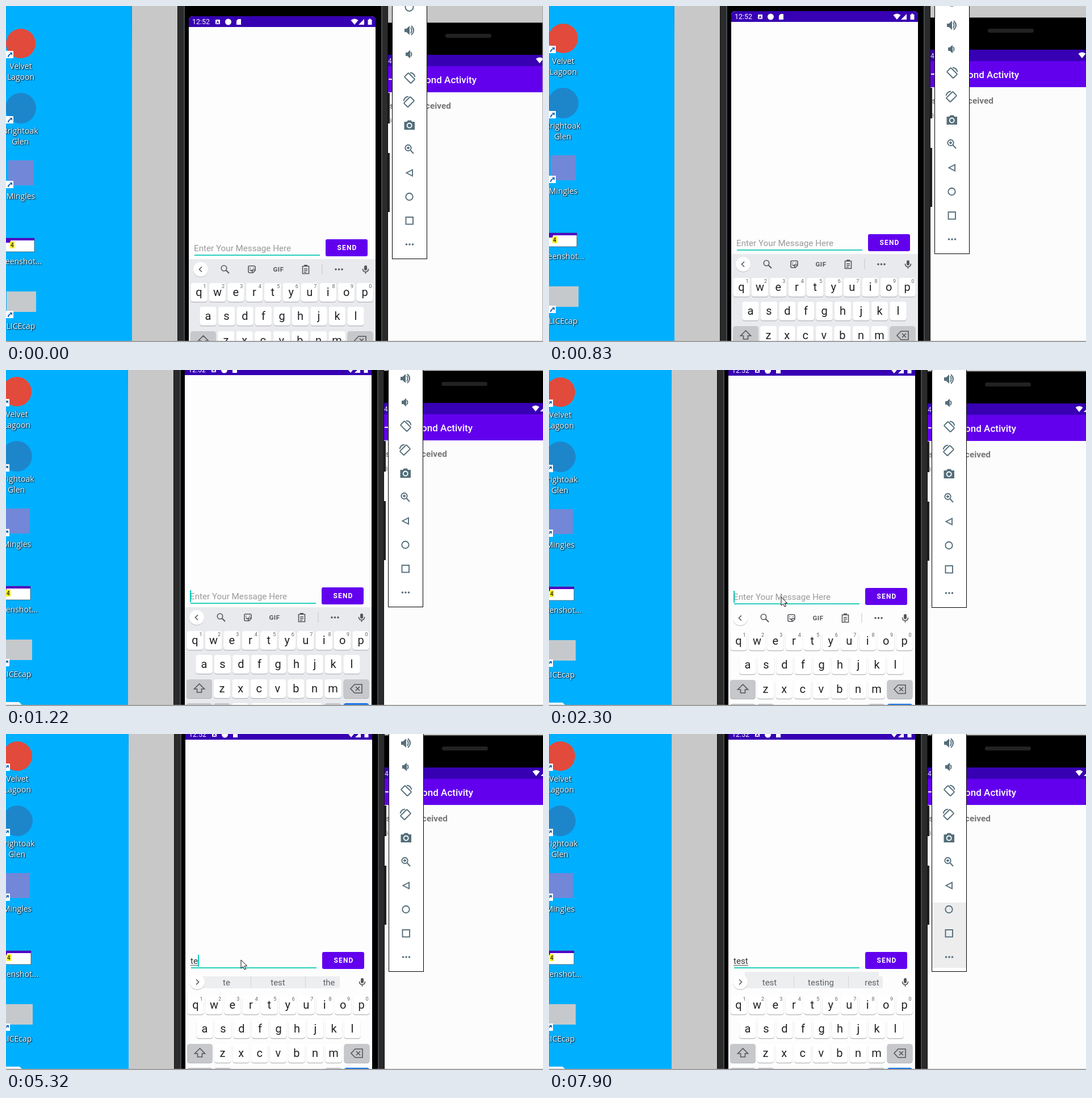
Write an HTML page that moves like this. It is 946 px wide and 592 px high and loops after 8000 ms.

```html
<!DOCTYPE html>
<html lang="en">
<head>
<meta charset="utf-8">
<title>Typing a message</title>
<style>
  html, body { margin: 0; width: 100%; height: 100%; overflow: hidden; background: #c8c8c8; }
  svg { display: block; width: 946px; height: 592px; font-family: Roboto, sans-serif; }
  .mid, .desk { text-anchor: middle; }
  .desk { font: 14px "Open Sans", sans-serif; fill: #fff; text-shadow: 1px 1px 2px #000, 0 0 2px #0008; }
  .line { fill: none; stroke: #546e7a; stroke-width: 1.9; }
  .solid { fill: #546e7a; }
  .dark { fill: none; stroke: #54575b; stroke-width: 1.6; }
</style>
</head>
<body>
<svg viewBox="0 0 946 592">
  <defs>
    <path id="wifi" d="M-6.5-3Q0-8 6.5-3L0 5z" fill="#fff"/>
    <path id="signal" d="M5-5V5H-5z" fill="#fff"/>
    <g id="shortcut">
      <rect width="13" height="13" fill="#fff"/>
      <path d="M3 11Q3 6 8 5L6 3H11V8L9 6Q5 8 5 11z" fill="#1668b5"/>
    </g>
    <g id="rotate" class="line">
      <rect x="-8" y="-5" width="16" height="10" rx="1" transform="rotate(45)"/>
      <path d="M1-9.500Q8-9 9.500-2"/>
    </g>
  </defs>
  <g id="world">
    <!-- desktop -->
    <rect x="-10" y="-10" width="980" height="680" fill="#c8c8c8"/>
    <rect x="-10" y="-10" width="232" height="680" fill="#00b0ff"/>
    <path d="M218-10L222 75V-10z" fill="#0aa4ec"/>
    <circle cx="26" cy="66" r="26" fill="#e24a3b"/>
    <circle cx="26" cy="180" r="27" fill="#1d86cb"/>
    <rect x="4" y="272" width="44" height="44" fill="#7387d8"/>
    <path d="M-10 409H50V433H-10z" fill="#fff" stroke="#333" stroke-width=".6"/>
    <path d="M-10 409H50V413H8V417H-10z" fill="#5300c4"/>
    <rect x="7" y="415" width="8" height="12" fill="#f5ee25"/>
    <text x="8" y="425" font-size="10">4</text>
    <path d="M-4 415V433" stroke="#111" stroke-width="8"/>
    <rect x="1" y="503" width="52" height="36" fill="#c6c9cc"/>
    <path d="M0 613H30L39 622V650H0z" fill="#f6f6f6"/>
    <use href="#shortcut" y="79"/><use href="#shortcut" y="194"/>
    <use href="#shortcut" y="308"/><use href="#shortcut" y="537"/>
    <g class="desk">
      <text x="26" y="111">Velvet</text><text x="26" y="130">Lagoon</text>
      <text x="25" y="225">Brightoak</text><text x="25" y="244">Glen</text>
      <text x="26" y="340">Mingles</text>
      <text x="63" y="455" text-anchor="end">Screenshot...</text>
      <text x="26" y="569">LICEcap</text>
    </g>

    <!-- phone behind -->
    <rect x="660" y="29" width="300" height="60" fill="#000"/>
    <path d="M660 29.500H960" stroke="#4a4a4a"/>
    <rect x="774" y="49" width="81" height="7" rx="3.500" fill="#222"/>
    <rect x="660" y="86" width="300" height="20" fill="#3700b3"/>
    <rect x="660" y="106" width="300" height="46" fill="#6200ee"/>
    <rect x="660" y="152" width="300" height="500" fill="#fcfcfc"/>
    <use href="#wifi" x="940" y="96"/><use href="#signal" x="953" y="96"/>
    <text x="673" y="101" font-size="12" fill="#ddd">4</text>
    <path d="M674 129H680" stroke="#fff" stroke-width="2"/>
    <g text-anchor="end" font-weight="500">
      <text x="829" y="136" font-size="17" fill="#fff">Second Activity</text>
      <text x="784" y="181" font-size="15.400" font-weight="700" fill="#777">Message Received</text>
    </g>
    <text x="673" y="205" font-size="12" fill="#888">a</text>

    <!-- phone in front -->
    <rect x="302" y="-10" width="371" height="680" fill="#111"/>
    <rect x="303" y="-10" width="369" height="680" fill="#2b2b2b"/>
    <rect x="313" y="-10" width="350" height="680" fill="#444a50"/>
    <rect x="315" y="-10" width="346" height="680" fill="#000"/>
    <path d="M674.500 153V207M674.500 259V363" stroke="#222" stroke-width="3"/>
    <path d="M322 660V26Q322 18 330 18H643Q651 18 651 26V660z" fill="#fdfdfd"/>
    <path d="M322 37V26Q322 18 330 18H643Q651 18 651 26V37z" fill="#3700b3"/>
    <text x="328" y="32" font-size="12.500" fill="#fff">12:52</text>
    <g fill="#fff">
      <rect x="369" y="24" width="8" height="8" rx="1"/>
      <circle cx="391.500" cy="28" r="5.500"/>
      <path d="M409 23H414V33H406V26z"/>
      <path d="M637.500 24H639.500V22.500H642.500V24H644.500V33H637.500z"/>
    </g>
    <text class="mid" x="373" y="31" font-size="7.500" font-weight="700" fill="#3700b3">A</text>
    <use href="#wifi" x="614" y="28"/><use href="#signal" x="626" y="28"/>

    <!-- message field -->
    <text id="message" x="331" y="432" font-size="15.200"></text>
    <path id="underline" stroke="#555"/>
    <rect id="caret" y="416" width="2" height="21" fill="#03cdb9"/>
    <path d="M332 439H553" stroke="#2ad0bd" stroke-width="2"/>
    <rect x="563" y="411" width="74" height="30" rx="3" fill="#6200ee"/>
    <text class="mid" x="601" y="430" font-size="12" font-weight="700" letter-spacing="1.100" fill="#fff">SEND</text>

    <!-- keyboard -->
    <rect id="board" x="322" y="446" width="329" height="210"/>
    <path id="strip" fill="#eceef0"/>
    <circle cx="343" cy="465" r="13" fill="#b9bbbe"/>
    <circle cx="343" cy="464" r="13" fill="#fff"/>
    <path id="chevron" class="dark" d="M2-4.500L-2.500 0L2 4.500"/>
    <g id="tools" class="dark">
      <circle cx="384" cy="462" r="4.700"/><path d="M387.500 465.500L393 471" stroke-width="2"/>
      <path d="M429 458H437Q439 458 439 460V466L435 470H429Q427 470 427 468V460Q427 458 429 458zM439 465H434V470M429.500 464.500Q432 468 434 465M430 461V462.500M436 461V462.500"/>
      <path d="M522.500 458.500H533.500V471.500H522.500zM525 463H531M525 466H531M525 469H529"/>
      <path d="M525 457.500H531" stroke-width="3"/>
      <path d="M557 455V473" stroke="#c3c6c9" stroke-width="1"/>
      <path d="M581 464H595" stroke-width="3.600" stroke-linecap="round" stroke-dasharray="0 5.500"/>
      <text class="mid" x="480" y="468" font-size="11.500" font-weight="700" letter-spacing=".5" fill="#54575b" stroke="none">GIF</text>
    </g>
    <g id="words" class="mid" font-size="15" fill="#606366">
      <path d="M437.500 454V474M533.500 454V474" stroke="#d2d4d6"/>
      <text x="394.500" y="470"></text><text x="485" y="470"></text><text x="575" y="470"></text>
    </g>
    <rect x="631" y="457" width="5" height="9" rx="2.500" fill="#54575b"/>
    <path class="dark" d="M628.500 463Q628.500 468.500 633.500 468.500T638.500 463M633.500 468V472"/>
    <g id="keys"></g>
    <path d="M347.500 581L338.500 590H343.500V596H351.500V590H356.500z" class="dark"/>
    <path d="M621 582H634V597H621L614 589.500zM623 586L630 593M630 586L623 593" class="dark"/>

    <!-- emulator controls -->
    <rect x="680.500" y="-10" width="61" height="455.500" fill="#fff" stroke="#000"/>
    <rect id="hover" x="681" y="324" width="60" height="115" fill="#ededee"/>
    <g class="line">
      <circle cx="710.500" cy="2" r="7"/>
      <path d="M713 38Q716 43 713 48M714 35Q722 43 714 51M713 81Q716 85 713 89"/>
      <circle cx="708.500" cy="250" r="5.200"/><path d="M712.500 254L718 260M706 250H711M708.500 247.500V252.500"/>
      <path d="M716 288.500V299.500L705.500 294z"/>
      <circle cx="710.500" cy="336" r="6.200"/>
      <rect x="704.500" y="372" width="12.500" height="12.500"/>
      <path d="M705.500 420H718" stroke-width="3.600" stroke-linecap="round" stroke-dasharray="0 5.500"/>
    </g>
    <path class="solid" d="M702 40H705.500L711 35V51L705.500 46H702zM704 82H707L712 77.500V92.500L707 88H704zM701.500 204H706L708 201.500H713.500L715.500 204H720V218H701.500z"/>
    <circle cx="710.700" cy="210.500" r="4" fill="#546e7a" stroke="#fff" stroke-width="1.800"/>
    <use href="#rotate" x="711" y="127"/>
    <use href="#rotate" transform="translate(710 169) scale(-1 1)"/>
  </g>
  <path id="cursor" d="M0 0V15L3.500 11.700L6 17L8.500 16L6 10.800H10.700z" fill="#fff" stroke="#111"/>
  <path d="M0 591H946" stroke="#a0a0a0" stroke-width="2"/>
  <path id="edge" d="M945.500 0V592" stroke="#a4a4a4"/>
</svg>
<script>
const LOOP = 8000;
const $ = id => document.getElementById(id);

// Keyboard
const GRAY = '#c6c8cb';
function key(x, y, w, fill = '#fff', label = '', hint = '') {
  const box = (dy, color) =>
    `<rect x="${x - w / 2}" y="${y + dy}" width="${w}" height="33" rx="4.500" fill="${color}"/>`;
  return box(1.2, '#b3b5b8') + box(0, fill) +
    `<text class="mid" x="${x}" y="${y + 23}" font-size="20" fill="#202124">${label}</text>` +
    `<text class="mid" x="${x + 10}" y="${y + 9}" font-size="9" fill="#606366">${hint}</text>`;
}
const row = (letters, x, y, step, hints = '') =>
  [...letters].map((c, i) => key(x + i * step, y, 29.5, '#fff', c, hints[i])).join('');
$('keys').innerHTML =
  row('qwertyuiop', 340, 488, 32.45, '1234567890') +
  row('asdfghjkl', 356, 530, 32.5) +
  row('zxcvbnm', 387.5, 573, 32.6) +
  key(347.5, 573, 45, GRAY) + key(624, 573, 45, GRAY) +
  key(347.5, 615, 45, GRAY) + key(387.5, 615, 29.5, GRAY) +
  key(420, 615, 29.5) + key(501, 615, 126) +
  key(583, 615, 29.5, GRAY) + key(624, 615, 45, '#1a73e8');

// Timelines: [start, ...values], each held until the next entry
const view = [[0, 0, 0], [270, 0, -1], [455, 0, -3], [640, -1, -6], [830, -1, -9],
  [950, -3, -16], [1085, -5, -23], [1220, -7, -28], [1500, -6, -27]];
const pointer = [[0, -50, -50], [1900, 470, 120], [2040, 440, 280], [2170, 412, 392],
  [2300, 409, 400], [3100, 412, 399], [3250, 414, 398], [6950, 450, 392], [7090, 520, 360],
  [7230, 600, 315], [7360, 650, 302], [7500, 690, 330], [7640, -50, -50]];
const typed = [[0, '', 331], [3920, 't', 337], [4050, 'te', 344],
  [5720, 'tes', 352], [6130, 'test', 357]];
const suggestions = [[0], [4190, 'te', 'test', 'the'], [5850, 'tes', 'test', 'testing'],
  [6400, 'test', 'testing', 'rest']];
const caretOn = [[0, false], [1220, true], [1750, false], [2240, true], [2680, false],
  [3100, true], [3650, false], [3920, true], [4730, false], [5320, true],
  [6820, false], [7360, true], [7900, false]];

const at = (track, t) => track.findLast(entry => entry[0] <= t).slice(1);
const show = (id, on) => $(id).setAttribute('visibility', on ? 'visible' : 'hidden');
const set = (id, name, value) => $(id).setAttribute(name, value);
const move = (id, [x, y]) => set(id, 'transform', `translate(${x} ${y})`);

function draw(now) {
  const t = now % LOOP;
  move('world', at(view, t));
  move('cursor', at(pointer, t));

  const [text, end] = at(typed, t);
  $('message').textContent = text || 'Enter Your Message Here';
  set('message', 'fill', text ? '#333' : '#9a9a9a');
  set('underline', 'd', text ? `M331 434.500H${end}` : '');
  set('caret', 'x', end);
  show('caret', at(caretOn, t)[0]);

  const words = at(suggestions, t), suggesting = words.length > 0;
  show('tools', !suggesting);
  show('words', suggesting);
  $('words').querySelectorAll('text').forEach((el, i) => el.textContent = words[i] || '');
  set('chevron', 'transform', `translate(343 464) scale(${suggesting ? -1 : 1} 1)`);
  set('strip', 'd', !suggesting ? '' : t < 6400 ? 'M351 454H594V475H351z'
    : 'M351 446H587V454H594V475H351z');

  set('board', 'fill', t < 1500 ? '#e8eaed' : '#fdfdfd');
  show('hover', t >= 7500);
  show('edge', t < 270);
}

function frame() {
  draw(performance.now());
  requestAnimationFrame(frame);
}
frame();
</script>
</body>
</html>
```
